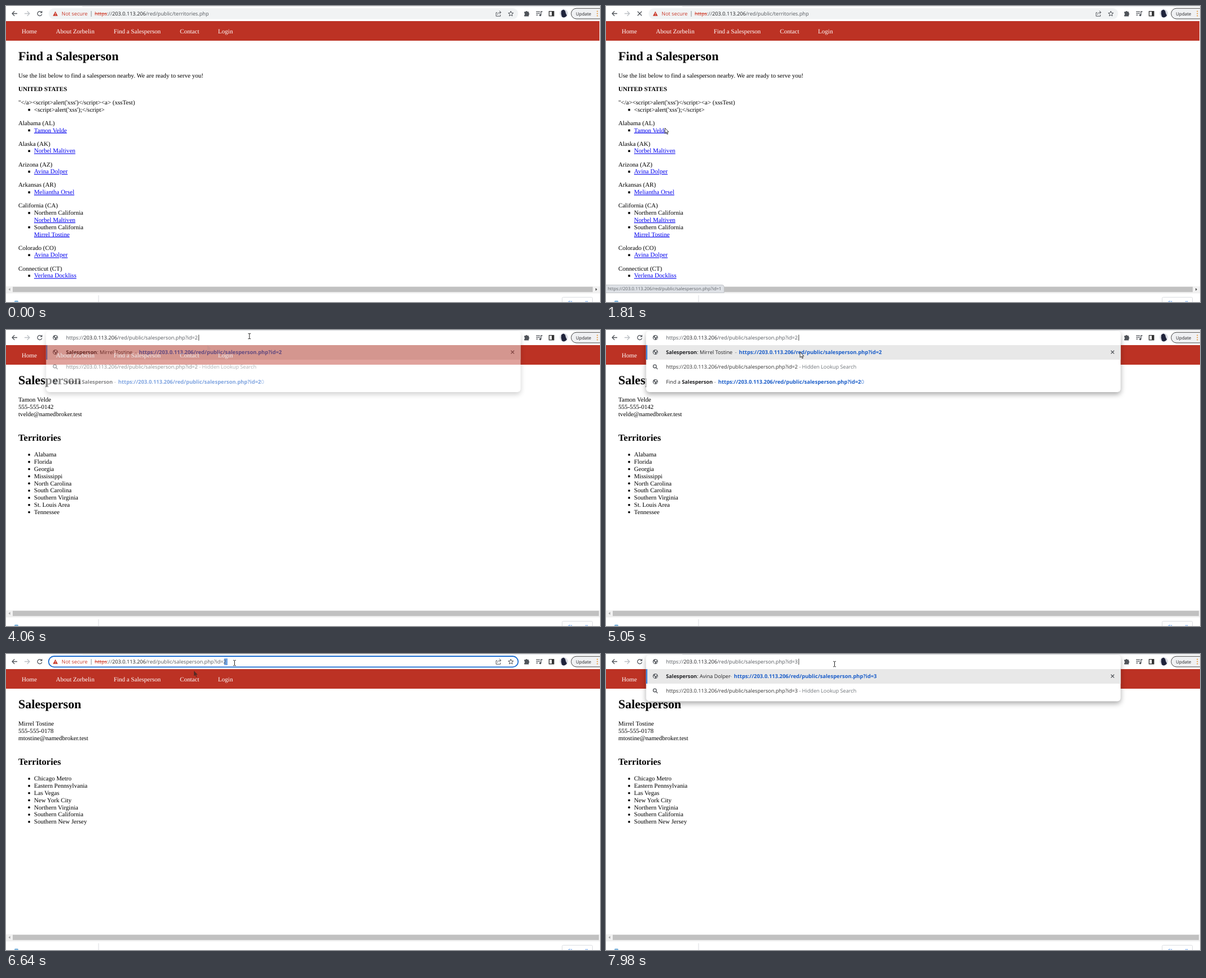
An HTML page that plays this animation: 1059x529 px, repeating every 8000 ms.

```html
<!DOCTYPE html>
<html lang="en">
<head>
<meta charset="utf-8">
<title>Salesperson pages</title>
<style>
  html, body { margin: 0; height: 100%; overflow: hidden; background: #fff; }
  svg { display: block; width: 100vw; height: 100vh; }
  text { font: 11.1px "Liberation Serif", serif; text-rendering: geometricPrecision; }
  .h1 { font-size: 22.2px; font-weight: 700; }
  .h2 { font-size: 16.6px; font-weight: 700; }
  .b { font-weight: 700; }
  .link { fill: #00e; text-decoration: underline; }
  .ui { font: 9.2px "Open Sans", "Noto Sans", sans-serif; }
  .small { font-size: 7.95px; }
  .url { font-size: 9.45px; font-weight: 700; }
  .line { fill: none; stroke: #50545a; stroke-width: 1.3; }
  .panel { filter: drop-shadow(0 4px 5px rgba(0, 0, 0, .34)); }
</style>
</head>
<body>
<svg viewBox="0 0 1059 529"></svg>
<script>
const svg = document.querySelector('svg');
const scheme = 'https', host = '203.0.113.206';
const person = n => 'salesperson.php?id=' + n;

const text = (x, y, s, cls = '', fill = '#000') =>
  `<text x="${x}" y="${y}" class="${cls}" fill="${fill}">${s}</text>`;
const ui = (x, y, s, fill = '#202124') => text(x, y, s, 'ui', fill);
const span = (s, attrs) => `<tspan ${attrs}>${s}</tspan>`;
const bold = s => span(s, 'class="b"');
const rect = (x, y, w, h, fill, more = '') =>
  `<rect x="${x}" y="${y}" width="${w}" height="${h}" fill="${fill}" ${more}/>`;
const dot = (x, y, r, fill) => `<circle cx="${x}" cy="${y}" r="${r}" fill="${fill}"/>`;
const line = (d, more = '') => `<path class="line" d="${d}" ${more}/>`;
const shape = (d, fill, more = '') => `<path d="${d}" fill="${fill}" ${more}/>`;
const group = (id, s) => `<g id="${id}">${s}</g>`;

const address = page => `${scheme}://${host}/red/public/${page}`;
const typed = page => `${scheme}://${span(host, 'fill="#202124"')}/red/public/${page}`;
const unsafe = page =>
  span(scheme, 'fill="#d0402f" text-decoration="line-through"') + typed(page).slice(scheme.length);

const globe = y => dot(88, y, 4.6, '#5f6368') +
  shape(`M84.6 ${y - 1}l3 2.4-.6 2.2-1.6-.8zM88 ${y - 3.6}l2.8 1.4-1.6 2.2-2.4-.8zM90 ${y + 1}l2-.4-1.6 2.8z`, '#fff');
const lens = y => `<circle class="line" cx="87" cy="${y - 1}" r="2.8"/>` + line(`M89 ${y + 1}l3 3`);

const star = (x, y) => {
  const pts = [...Array(10)].map((_, i) => {
    const a = Math.PI * (i / 5 - .5), r = i % 2 ? 2.1 : 4.8;
    return `${x + r * Math.cos(a)},${y + r * Math.sin(a)}`;
  });
  return `<polygon class="line" style="stroke-width:1" points="${pts.join(' ')}"/>`;
};

// Web pages
const nav = rect(0, 27, 1059, 35, '#bc3224') +
  [[28, 'Home'], [89, 'About Zorbelin'], [192, 'Find a Salesperson'], [310, 'Contact'], [378, 'Login']]
    .map(([x, s]) => text(x, 48.7, s, '', '#fff')).join('');

const states = [
  ['Alabama (AL)', 'Tamon Velde'],
  ['Alaska (AK)', 'Norbel Maltiven'],
  ['Arizona (AZ)', 'Avina Dolper'],
  ['Arkansas (AR)', 'Meliantha Orsel'],
  ['California (CA)', 'Northern California/Norbel Maltiven', 'Southern California/Mirrel Tostine'],
  ['Colorado (CO)', 'Avina Dolper'],
  ['Connecticut (CT)', 'Verlena Dockliss'],
];

function listPage() {
  const square = y => rect(39.5, y - 5, 3.6, 3.6, '#000');
  let out = text(22, 97, 'Find a Salesperson', 'h1') +
    text(22, 128, 'Use the list below to find a salesperson nearby. We are ready to serve you!') +
    text(22, 151.9, 'UNITED STATES', 'b') +
    text(22, 176, '"&lt;/a&gt;&lt;script&gt;alert(\'xss\')&lt;/script&gt;&lt;a&gt; (xssTest)') +
    square(188.8) + text(50, 188.8, '&lt;script&gt;alert(\'xss\');&lt;/script&gt;');
  let y = 212.7;
  for (const [state, ...items] of states) {
    out += text(22, y, state);
    for (const item of items) {
      const lines = item.split('/');
      out += square(y + 12.8);
      lines.forEach((s, i) => out += text(50, y += 12.8, s, i == lines.length - 1 ? 'link' : ''));
    }
    y += 24.1;
  }
  return out;
}

const personPage = (details, places) => text(22, 97, 'Salesperson', 'h1') +
  details.map((s, i) => text(22, 128 + 12.85 * i, s)).join('') +
  text(22, 198.2, 'Territories', 'h2') +
  places.map((s, i) => {
    const y = 226.3 + 12.83 * i;
    return dot(41.2, y - 3.4, 1.9, '#000') + text(50, y, s);
  }).join('');

// Browser frame
const toolbar = rect(0, 0, 1059, 27, '#fff') + rect(136, 0, 923, 1, '#dfe1e5') +
  line('M20 13.5H11.5M15.2 9.3l-4.2 4.2 4.2 4.2') +
  line('M33 13.5h8.5M37.8 9.3l4.2 4.2-4.2 4.2', 'style="stroke:#bcc0c4"') +
  group('reload', line('M63 10.8A4 4 0 1 0 64 14.6') + shape('M64.6 8.6v4h-4z', '#50545a')) +
  group('stop', line('M56.3 9.8l7.4 7.4M63.7 9.8l-7.4 7.4')) +
  shape('M924 10.2h2.2a1.9 1.9 0 0 1 3.6 0h2.2v2.4a1.9 1.9 0 0 1 0 3.4v2.5h-8v-2.6a1.6 1.6 0 0 0 0-3z', '#50545a') +
  line('M945 10.2h7M945 13.2h7M945 16.2h3.5M953.8 16V10h2.6') + dot(952.5, 16.4, 1.8, '#50545a') +
  rect(968.3, 9.6, 8.4, 8.2, 'none', 'stroke="#333" stroke-width="1.3"') + rect(973, 9.6, 4, 8.2, '#333') +
  dot(994.5, 13.3, 7.3, '#d9dbe3') +
  shape('M990 9q4-5 7 0l1 4 2 4q-5 6-9 2-2-5-1-10z', '#20243c') +
  rect(1007.6, 4.2, 60, 18.8, '#f0f1f3', 'rx="9.4" stroke="#444"') +
  text(1016, 16.5, 'Update', 'ui small', '#202124') +
  [9.5, 13.5, 17.5].map(y => dot(1054.3, y, 1.1, '#e8912d')).join('');

const omnibox =
  group('pill', rect(76, 4, 837, 19.5, '#f1f3f4', 'rx="9.7"')) +
  group('ring', rect(76, 4, 837, 19.3, '#fff', 'rx="9.6" stroke="#1c6dd0" stroke-width="1.8"')) +
  rect(0, 8, 0, 12, '#72a5e4', 'id="selection"') +
  shape('M88 9.6l4.4 8.2h-8.8z', '#c93a2b') + rect(87.6, 12.4, .9, 2.6, '#fff') + rect(87.6, 15.8, .9, 1, '#fff') +
  ui(99, 17.2, 'Not secure', '#c93a2b') + rect(151.5, 9, 1, 10, '#8a8d91') +
  ['territories.php', person(1), person(2)]
    .map((p, i) => group('url' + i, ui(158, 17.2, unsafe(p), '#55595e'))).join('') +
  line('M876 11.8h-2.2v6.4h7.6v-2.6M876.3 15.4q.5-4 5.6-4M879.6 8.6l3 2.8-3 2.8', 'style="stroke-width:1"') +
  star(900, 14);

const footer = rect(0, 501, 1059, 11.5, '#f1f1f1') +
  shape('M7.5 504v5l-3-2.5z', '#a3a3a3') +
  rect(12, 501.8, 1045, 9.4, '#c1c1c1') +
  group('rightEnd', rect(1058, 27, 1, 35, '#fff') + rect(1046, 501, 13, 11.5, '#f1f1f1') +
    shape('M1051 504v5l3-2.5z', '#505050')) +
  rect(0, 512.5, 1059, 17, '#fff') + rect(0, 512.5, 1059, .8, '#e4e4e4') +
  rect(164.5, 517, 1, 12, '#dadce0') + rect(15, 526.5, 7, 3, '#7fb4dc', 'rx="1.5"') +
  rect(991.5, 520.5, 54, 20, '#fff', 'rx="2" stroke="#dadce0"') + ui(1002, 534, 'Show all', '#1a73e8') +
  group('status', shape('M-1 498.5H207q3.5 0 3.5 3.5v10.5H-1z', '#dee1e6', 'stroke="#c4c7cb"') +
    text(3, 507.9, address(person(1)), 'ui small', '#5f6368'));

// Suggestion rows
const rowY = i => 39.5 + 26.5 * i;
const urlText = (i, x, s) => text(x, rowY(i) + 3.4, s, 'ui url', '#1a5dc9');
const site = (i, title, url, x) => globe(rowY(i)) + ui(107, rowY(i) + 3.4, title) +
  ui(x - 7, rowY(i) + 3.4, '-', '#70757a') + urlText(i, x, url);
const search = (i, page) => lens(rowY(i)) + ui(107, rowY(i) + 3.4,
  address(page) + span(' - Hidden Lookup Search', 'fill="#70757a"'), '#333');
const rep = (i, name, n, x) => site(i, bold('Salesperson') + ': ' + name, address(person(n)), x);
const find = i => site(i, 'Find a ' + bold('Salesperson'),
  address(person(2)) + span('0', 'font-weight="400" fill="#4f86dc"'), 200);
const panel = (id, count, rows) => group(id,
  rect(71.5, 2, 846, 29.5 + 26.5 * count, '#fff', 'rx="6" class="panel"') +
  rect(71.5, 27, 846, 26, '#e8e8e8') + rect(71.5, 27, 2, 26, '#1a6ad4') +
  line('M900.3 36.8l5.6 5.6M905.9 36.8l-5.6 5.6') + rows);

const typedPages = [person(2), person(''), person(3)];
const drop =
  panel('panel0', 3, rep(0, 'Mirrel Tostine', 2, 237) + search(1, person(2)) + find(2)) +
  panel('panel1', 6, globe(rowY(0)) + urlText(0, 107, address(person(''))) +
    search(1, person('')) + rep(2, 'Tamon Velde', 1, 232) + rep(3, 'Mirrel Tostine', 2, 237) +
    find(4) + rep(5, 'Avina Dolper', 3, 228)) +
  panel('panel2', 2, rep(0, 'Avina Dolper', 3, 228) + search(1, person(3)));
const dropBar = rect(71.5, 2, 846, 25, '#fff', 'rx="5"') + globe(13.5) +
  typedPages.map((p, i) => group('typed' + i, ui(107, 17.2, typed(p), '#55595e'))).join('');

const arrow = 'M0 0v9.6l2.3-2 1.6 3.6 1.5-.7-1.6-3.4h3z';
svg.innerHTML = rect(0, 0, 1059, 529, '#fff') + nav +
  group('page0', listPage()) +
  group('page1', personPage(['Tamon Velde', '555-555-0142', 'tvelde@namedbroker.test'],
    ['Alabama', 'Florida', 'Georgia', 'Mississippi', 'North Carolina', 'South Carolina',
      'Southern Virginia', 'St. Louis Area', 'Tennessee'])) +
  group('page2', personPage(['Mirrel Tostine', '555-555-0178', 'mtostine@namedbroker.test'],
    ['Chicago Metro', 'Eastern Pennsylvania', 'Las Vegas', 'New York City', 'Northern Virginia',
      'Southern California', 'Southern New Jersey'])) +
  group('trail1', shape(arrow, '#702018', 'transform="translate(359 27)" opacity=".3"')) +
  group('trail2', shape(arrow, '#4a2a26', 'transform="translate(335 30)" opacity=".9"')) +
  footer + toolbar + group('omnibox', omnibox) + drop + group('dropBar', dropBar) +
  rect(0, 8.5, 1, 10.5, '#444', 'id="caret"') +
  group('cursor', group('glow', dot(-.5, 0, 7.3, '#f8ec5a')) +
    group('arrow', shape(arrow, '#fff', 'stroke="#222" stroke-width=".9"')) +
    group('beam', line('M-2.4-4.7h1.6l.8.6.8-.6h1.6M0-4v8M-2.4 4.7h1.6l.8-.6.8.6h1.6', 'style="stroke:#222;stroke-width:1"')));

const el = id => document.getElementById(id);
const show = (id, on) => el(id).style.display = on ? '' : 'none';
const within = (t, ...spans) => spans.some(([a, b]) => t >= a && t < b);

// time, x, y
const path = [
  [70, 955, 513], [400, 560, 350], [730, 86, 196], [860, 172, 173], [1130, 125, 221], [1410, 105, 218],
  [1890, 105, 218], [2200, 355, 30], [2380, 424, 22], [2520, 431.5, 13], [3380, 431.5, 13], [3390, 434, 11],
  [4065, 434, 11], [4190, 344, 41], [4520, 344, 41], [4590, 346, 39.5], [5200, 346, 39.5],
  [5550, 336, 31], [5920, 407.5, 17], [6580, 407.5, 17], [6640, 407.5, 16], [7300, 407.5, 16], [7440, 407.5, 18],
];
function cursorAt(t) {
  const i = path.findIndex(k => k[0] > t);
  if (i < 0) return path.at(-1).slice(1);
  if (!i) return path[0].slice(1);
  const [a, b] = [path[i - 1], path[i]];
  const u = (t - a[0]) / (b[0] - a[0]);
  return [1, 2].map(n => a[n] + (b[n] - a[n]) * u);
}

function draw(t) {
  const page = t < 1890 ? 0 : t < 5500 ? 1 : 2;
  const url = t < 1890 ? 0 : t < 5200 ? 1 : 2;
  const open = within(t, [4060, 5200], [7300, 8000]);
  const focus = within(t, [2560, 4060], [6050, 7300]);
  const loading = within(t, [1610, 1890], [5200, 5500]);
  const press = within(t, [2560, 2790], [2990, 3060], [6050, 6180], [6580, 6640]);
  const entry = t < 7300 ? 0 : t < 7840 ? 1 : 2;
  const list = t < 7300 ? 0 : t < 7910 ? 1 : 2;
  const age = t - (t < 7300 ? 4060 : 7300);
  const fade = age < 70 ? .55 : age < 130 ? .85 : 1;

  for (const i of [0, 1, 2]) {
    show('page' + i, page == i);
    show('url' + i, url == i);
    show('typed' + i, entry == i);
    show('panel' + i, open && list == i);
    el('panel' + i).style.opacity = fade;
  }
  show('rightEnd', page == 0);
  show('status', within(t, [1610, 1890]));
  show('reload', !loading);
  show('stop', loading);
  show('omnibox', !open);
  show('dropBar', open);
  show('pill', !focus);
  show('ring', focus);
  show('trail1', within(t, [2220, 5200]));
  show('trail2', t >= 5580);

  const all = within(t, [2790, 2990], [6180, 6580]);
  const digit = within(t, [3060, 4060], [6640, 7300]);
  show('selection', all || digit);
  el('selection').setAttribute('x', all ? 158 : 388.8);
  el('selection').setAttribute('width', all ? 237 : 6.2);

  show('caret', press || open && !within(t, [4520, 5050]));
  el('caret').setAttribute('x', !open ? 394.5 : entry == 1 ? 338 : 343.2);

  const [x, y] = cursorAt(t);
  el('cursor').setAttribute('transform', `translate(${x} ${y})`);
  show('cursor', t >= 70);
  show('glow', press);
  show('beam', y < 24);
  show('arrow', y >= 24);
}

const start = performance.now();
function tick() {
  draw((performance.now() - start) % 8000);
  requestAnimationFrame(tick);
}
tick();
</script>
</body>
</html>
```
